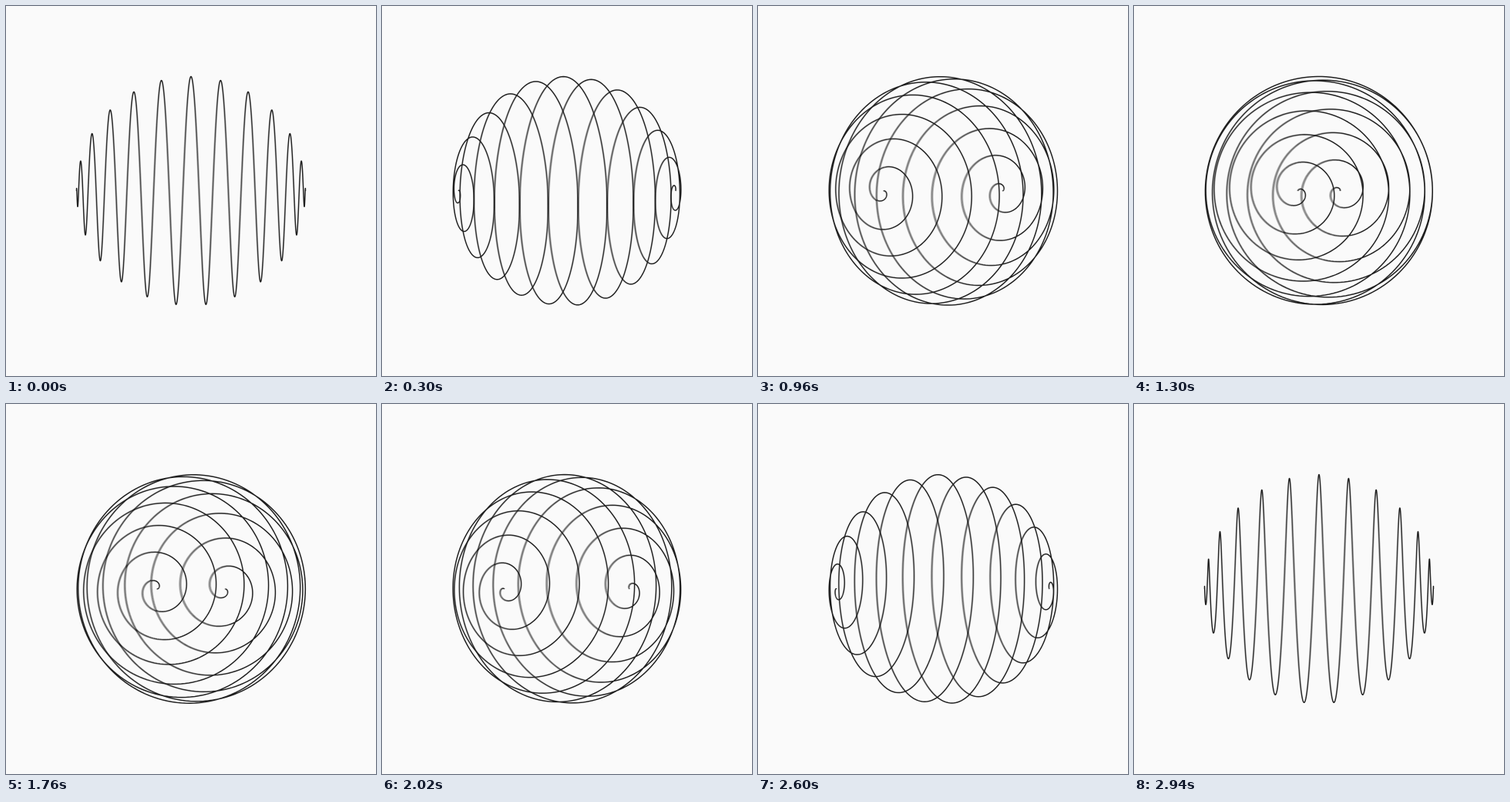
An HTML page with a canvas for the animation above (2.96 s loop, 480x480 px).

```html
<!DOCTYPE html>
<html lang="en">
<head>
<meta charset="utf-8">
<title>Spherical spiral</title>
<style>
  html, body { margin: 0; width: 100%; height: 100%; overflow: hidden; background: #fafafa; }
  canvas { display: block; width: 480px; height: 480px; }
</style>
</head>
<body>
<canvas id="stage" width="480" height="480"></canvas>
<script>
const LOOP = 2960, STEP = 20, FRAMES = LOOP / STEP;
const CENTER = 240, RADIUS = 148.5;
const TURNS = 12, ROLLS = 5, POINTS = 1800;
const SAMPLES = 5, SHUTTER = 0.6;

const ctx = document.getElementById('stage').getContext('2d');
ctx.strokeStyle = `rgba(32, 32, 32, ${1 / SAMPLES})`;
ctx.lineWidth = 1.5;
ctx.lineJoin = 'round';
// Additive alpha makes the samples average exactly.
ctx.globalCompositeOperation = 'lighter';

// The spiral yaws half a turn per loop while rolling about its own axis.
function strokeSpiral(u) {
  const yaw = Math.PI * u;
  const cosYaw = Math.cos(yaw), sinYaw = Math.sin(yaw);
  const roll = 2 * Math.PI * ROLLS * (1 - cosYaw) / 2;
  ctx.beginPath();
  for (let i = 0; i <= POINTS; i++) {
    const lat = Math.PI * i / POINTS;
    const lon = 2 * TURNS * lat - roll;
    const ring = Math.sin(lat);
    const x = Math.cos(lat) * cosYaw - ring * Math.sin(lon) * sinYaw;
    const y = -ring * Math.cos(lon);
    ctx.lineTo(CENTER + RADIUS * x, CENTER + RADIUS * y);
  }
  ctx.stroke();
}

function draw(frame) {
  ctx.clearRect(0, 0, 480, 480);
  for (let s = 0; s < SAMPLES; s++) {
    strokeSpiral((frame + s * SHUTTER / SAMPLES) / FRAMES);
  }
}

const start = performance.now();
let shown = -1;

function tick() {
  const time = (performance.now() - start) % LOOP;
  const frame = Math.floor(time / STEP + 0.01) % FRAMES;
  if (frame !== shown) {
    draw(frame);
    shown = frame;
  }
  requestAnimationFrame(tick);
}
tick();
</script>
</body>
</html>
```
